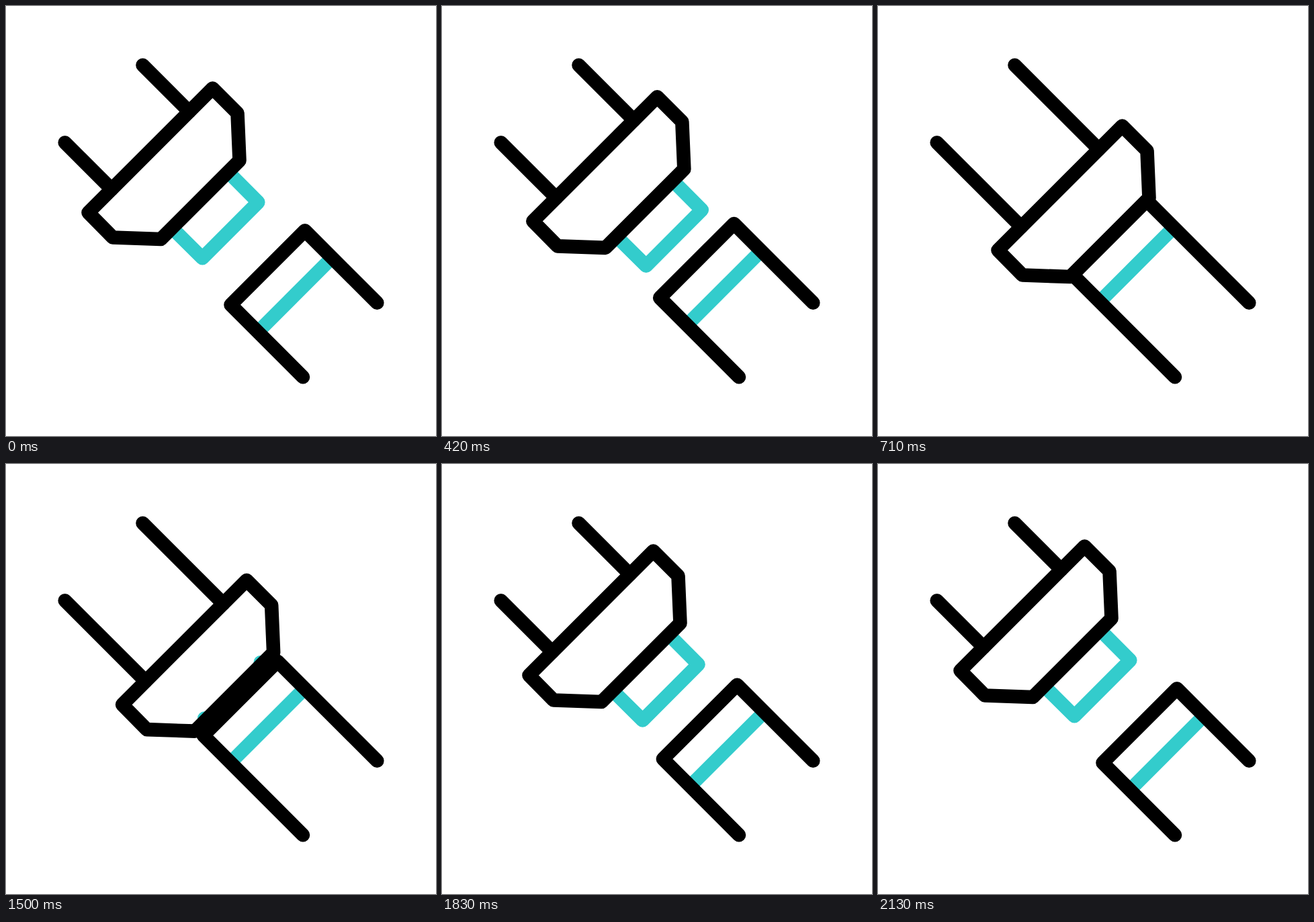
Recreate the animation shown at these times as an HTML page. Size 640 px wide and 640 px high, loop 3 s.

```html
<!DOCTYPE html>
<html lang="en">
<head>
<meta charset="utf-8">
<title>Plug and socket</title>
<style>
  html, body { margin: 0; width: 100%; height: 100%; overflow: hidden; background: #fff; }
  svg { display: block; width: 100%; height: 100%; }
  path { fill: none; stroke: #000; stroke-width: 20.6; stroke-linecap: round; stroke-linejoin: round; }
  .accent { stroke: #33cccc; }
  .cover { fill: #fff; stroke: none; }
</style>
</head>
<body>
<svg viewBox="0 0 640 640">
  <path id="tab" class="accent"/>
  <path id="cover" class="cover"/>
  <path id="stripe" class="accent" style="stroke-linecap:butt"/>
  <path id="socket"/>
  <path id="leads"/>
  <path id="plug" d="M307.5 122.5L344.5 159.5L347.5 230L230.5 347L159 344.5L122.5 307.5Z"/>
</svg>
<script>
const LOOP = 3000, FRAME = 1000 / 24;
const STEPS = 16, JOIN_START = 1, PART_END = 51;
const PLUG_SHIFT = 56, TAB_SHIFT = 50, SOCKET_SHIFT = -45;
const el = id => document.getElementById(id);

// Cubic Bezier easing, solved by bisection
function bezier(x1, y1, x2, y2) {
  const at = (a, b, s) => 3 * (1 - s) * (1 - s) * s * a + 3 * (1 - s) * s * s * b + s * s * s;
  return x => {
    if (x <= 0) return 0;
    if (x >= 1) return 1;
    let lo = 0, hi = 1;
    for (let i = 0; i < 30; i++) {
      const mid = (lo + hi) / 2;
      if (at(x1, x2, mid) < x) lo = mid; else hi = mid;
    }
    return at(y1, y2, lo);
  };
}
const ease = bezier(0.75, 0, 5 / 6, 5 / 6);

// Points are [x, y]; slide moves one along the plug's axis
const slide = (d, ...pts) => pts.map(([x, y]) => [x + d, y + d]);
const line = pts => "M" + pts.map(p => p.join(" ")).join("L");

function draw(time) {
  const frame = Math.floor((time % LOOP + 5) / FRAME);
  const k = ease(Math.min(frame - JOIN_START, PART_END - frame) / STEPS);
  const p = k * PLUG_SHIFT, s = k * SOCKET_SHIFT;

  el("plug").setAttribute("transform", `translate(${p} ${p})`);
  el("leads").setAttribute("d",
    line([[203.5, 88], ...slide(p, [272.7, 157.2])]) +
    line([[87.7, 203.3], ...slide(p, [157.2, 272.7])]));

  el("tab").setAttribute("d", line(slide(k * TAB_SHIFT,
    [333.5, 250], [375.3, 292.1], [292.3, 375.2], [250.1, 333.4])));
  el("tab").setAttribute("visibility", k < 1 ? "visible" : "hidden");

  const socket = line([[552.3, 441.8],
    ...slide(s, [444.9, 334.4], [334.5, 444.7]), [442, 552.2]]);
  el("socket").setAttribute("d", socket);
  el("cover").setAttribute("d", socket + "Z");
  el("stripe").setAttribute("d", line(slide(s, [485.2, 374.8], [374.8, 485.2])));
}

const start = performance.now();
function tick(now) {
  draw(Math.max(0, now - start));
  requestAnimationFrame(tick);
}
draw(0);
requestAnimationFrame(tick);
</script>
</body>
</html>
```
